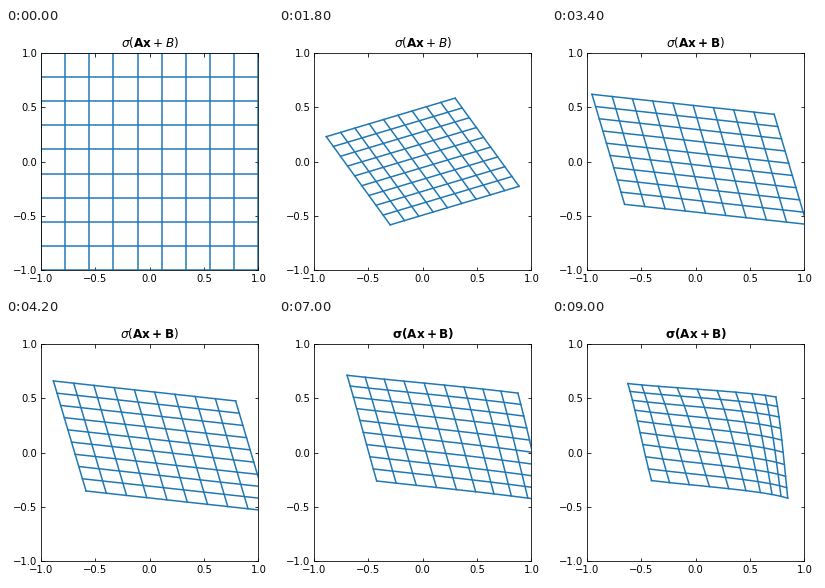
Animation of 267 by 263 pixels, one loop 9100 ms. Source, as a matplotlib script:

```python
import numpy as np
import matplotlib.pyplot as plt
from matplotlib.animation import FuncAnimation

W, H, DPI = 267, 263, 72
PHASE = 30   # frames each for: linear map, shift, squashing
STEP = 10    # frames between neighbouring matrices

plt.rcParams.update({"font.family": "DejaVu Sans", "font.size": 10,
                     "axes.linewidth": 0.8, "mathtext.fontset": "dejavusans"})

MATRICES = np.array([
    [[1, 0], [0, 1]],
    [[0.715, 0.282], [-0.170, 0.636]],
    [[0.562, -0.438], [0.264, 0.348]],
    [[0.838, -0.150], [-0.092, 0.506]],
])
SHIFT = np.array([0.257, 0.150])
TITLES = [r"$\sigma(\mathbf{Ax} + B)$",
          r"$\sigma(\mathbf{Ax + B})$",
          r"$\mathbf{\sigma(Ax + B)}$"]

side = np.linspace(-1, 1, 10)
grid = np.stack(np.meshgrid(side, side), axis=-1)


def lerp(a, b, t):
    return a + (b - a) * t


def matrix_at(frame):
    i, k = divmod(min(frame, PHASE), STEP)
    if i == len(MATRICES) - 1:
        return MATRICES[-1]
    return lerp(MATRICES[i], MATRICES[i + 1], k / STEP)


def progress(frame, phase):
    return np.clip(frame / PHASE - phase, 0, 1)


def points_at(frame):
    pts = grid @ matrix_at(frame).T + SHIFT * progress(frame, 1)
    return lerp(pts, np.tanh(pts), progress(frame, 2))


fig = plt.figure(figsize=(W / DPI, H / DPI), dpi=DPI, facecolor="white")
size, left, top = 217.44, 34.94, 24.78
ax = fig.add_axes([left / W, 1 - (top + size) / H, size / W, size / H])
ax.set(xlim=(-1, 1), ylim=(-1, 1))
ticks = np.linspace(-1, 1, 5)
ax.set_xticks(ticks)
ax.set_yticks(ticks)
ax.tick_params(direction="in", top=True, right=True, length=3.5, width=0.8, pad=3.5)
title = ax.set_title(TITLES[0], fontsize=12, pad=6)

rows = [ax.plot([], [], color="C0", lw=1.5)[0] for _ in side]
cols = [ax.plot([], [], color="C0", lw=1.5)[0] for _ in side]


def draw(frame):
    pts = points_at(frame)
    for i, (row, col) in enumerate(zip(rows, cols)):
        row.set_data(*pts[i].T)
        col.set_data(*pts[:, i].T)
    title.set_text(TITLES[min(frame // PHASE, 2)])
    return rows + cols + [title]


anim = FuncAnimation(fig, draw, frames=3 * PHASE + 1, interval=100,
                     repeat=True, repeat_delay=0, blit=False)
plt.show()
```
